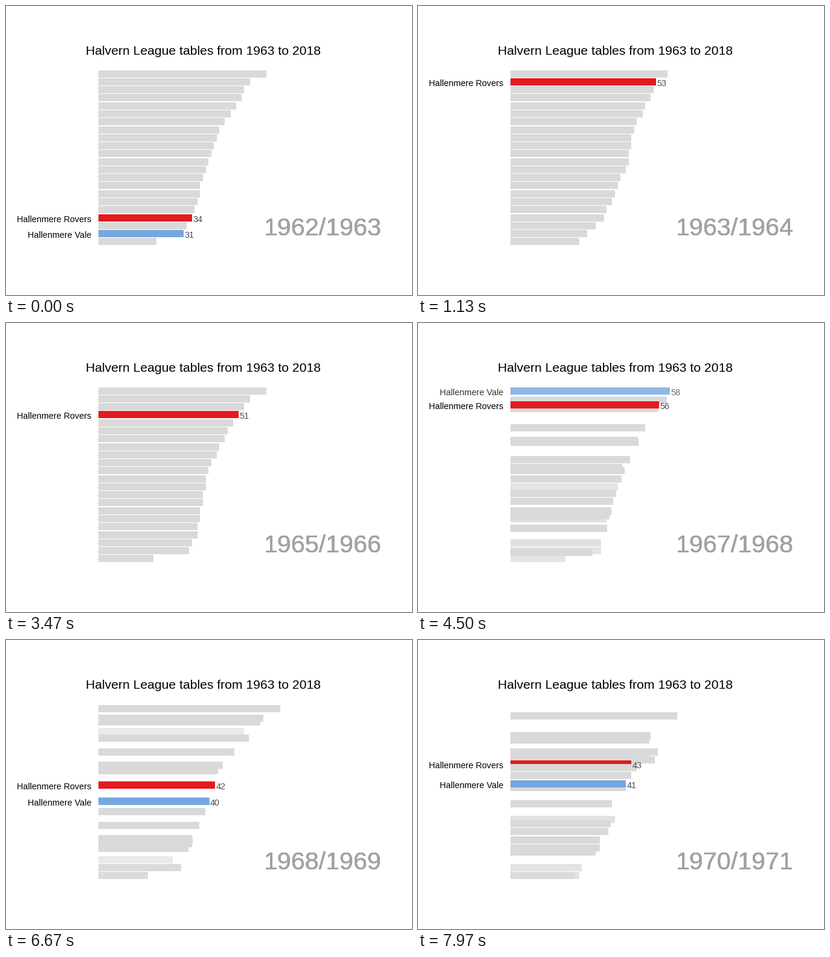
Animation, 672 px wide and 480 px high, one loop 8 s. Source, as a matplotlib script:

```python
import math

import matplotlib.pyplot as plt
import numpy as np
from matplotlib.animation import FuncAnimation
from matplotlib.patches import Rectangle

plt.rcParams["font.family"] = "Liberation Sans"

W, H, DPI = 672, 480, 100
TICK, LOOP = 20, 8000          # ms
STEPS_PER_MS = 0.03            # 30 poses per second
PERIOD, HOLD, MOVE = 35, 24, 10

LEFT, UNIT = 152.87, 4.557     # bar start and pixels per point
TOP, PITCH, THICK = 106.56, 13.28, 12
LABEL_GAP = 15                 # labels push each other this far apart
FADED = 0.5                    # opacity at the outer end of a fade

GREY = "#d9d9d9"
CLUBS = {"U": ("Hallenmere Rovers", "#e31b20"),
         "C": ("Hallenmere Vale", "#75a7df")}

KEY_RANKS = (0, 1, 3, 7, 11, 18, 20, 21)
seasons = []


def season(year, order, *key_points):
    """A final table: a letter per club, best first, and its points curve."""
    curve = np.interp(range(len(order)), KEY_RANKS, key_points)
    table = {club: (rank, math.ceil(pts - 0.5))
             for rank, (club, pts) in enumerate(zip(order, curve))}
    seasons.append((f"{year}/{year + 1}", table))


season(1962, "ETBLWSAPFsbHpwVfIoUmCO", 61, 55, 52, 44, 40, 34, 31, 21)
season(1963, "PUETcSbABwLsFHfWKpVmoI", 57, 53, 51, 45, 43, 34, 28, 25)
season(1964, "UlcEFTPSHbKBAwdVpLsfWm", 61, 61, 49, 43, 42, 35, 30, 27)
season(1965, "PlBUcwLTsKEHpANVSFdfnb", 61, 55, 51, 44, 39, 36, 33, 20)
season(1967, "CUPlEcTwANFHLBdtWKSvsf", 58, 56, 53, 46, 38, 34, 32, 27)
season(1968, "lPEAcTtHNwUICBSWdFKvLQ", 67, 61, 56, 44, 41, 33, 30, 18)
season(1969, "ElcDPvNUKCTAWBFwHItRdS", 66, 57, 53, 45, 42, 29, 26, 25)
season(1970, "AlTWPctUDvCNKEhFwRIHBp", 65, 64, 52, 43, 41, 34, 27, 23)

fig = plt.figure(figsize=(W / DPI, H / DPI), dpi=DPI, facecolor="white")
ax = fig.add_axes([0, 0, 1, 1])
ax.set_xlim(0, W)
ax.set_ylim(H, 0)
ax.axis("off")


def label(x, y, text, px, color, ha):
    return ax.text(x, y, text, fontsize=px * 72 / DPI, color=color,
                   ha=ha, va="baseline", zorder=5)


label(326, 81, "Halvern League tables from 1963 to 2018",
      21.2, "black", "center")

# stacked copies give the year its hard, heavy edge
years = [label(427, 381, "", 41.3, "#a2a2a2", "left") for _ in range(6)]

bars = [ax.add_patch(Rectangle((LEFT, 0), 1, THICK, lw=0, zorder=1 + i / 100))
        for i in range(30)]
names = {c: label(141.5, 0, CLUBS[c][0], 14.4, "black", "right")
         for c in CLUBS}
values = {c: label(0, 0, "", 14.4, "#4d4d4d", "left") for c in CLUBS}


def mix(a, b, p):
    return a + (b - a) * p


def blend(old, new, p):
    """Yield club, rank, points, shown points and opacity, back to front."""
    for club in list(old) + [c for c in new if c not in old]:
        if club not in new:
            if p < 1:
                rank, pts = old[club]
                yield club, rank, pts, pts, mix(1, FADED, p)
        elif club not in old:
            if p > 0:
                rank, pts = new[club]
                yield club, rank, pts, pts, mix(FADED, 1, p)
        else:
            (r0, p0), (r1, p1) = old[club], new[club]
            shown = p0 if p < 0.5 else p1
            yield club, mix(r0, r1, p), mix(p0, p1, p), shown, 1


def spread(heights):
    """Push two labels apart around their middle when they would collide."""
    if len(heights) == 2:
        upper, lower = sorted(heights, key=heights.get)
        push = (LABEL_GAP - heights[lower] + heights[upper]) / 2
        if push > 0:
            heights[upper] -= push
            heights[lower] += push
    return heights


def draw(n):
    t = n * TICK + TICK / 2
    index, step = divmod(int((t + 4) * STEPS_PER_MS), PERIOD)
    p = min(max(step - HOLD, 0) / MOVE, 1)
    (year0, old), (year1, new) = seasons[index], seasons[index + 1]

    for text in years:
        text.set_text(year0 if p < 0.5 else year1)
    for artist in [*bars, *names.values(), *values.values()]:
        artist.set_visible(False)

    heights = {}
    for bar, (club, rank, pts, shown, alpha) in zip(bars, blend(old, new, p)):
        y = TOP + PITCH * rank
        bar.set_bounds(LEFT, y, pts * UNIT, THICK)
        bar.set_facecolor(CLUBS[club][1] if club in CLUBS else GREY)
        bar.set_alpha(alpha)
        bar.set_visible(True)
        if club in CLUBS:
            heights[club] = y + THICK + 1
            values[club].set_text(str(shown))
            values[club].set_x(LEFT + pts * UNIT + 1.5)
            for text in (names[club], values[club]):
                text.set_alpha(alpha)
                text.set_visible(True)

    for club, y in spread(heights).items():
        names[club].set_y(y)
        values[club].set_y(y)
    return []


anim = FuncAnimation(fig, draw, frames=LOOP // TICK, interval=TICK,
                     init_func=lambda: draw(0), repeat=True, repeat_delay=0,
                     blit=False, cache_frame_data=False)
plt.show()
```
